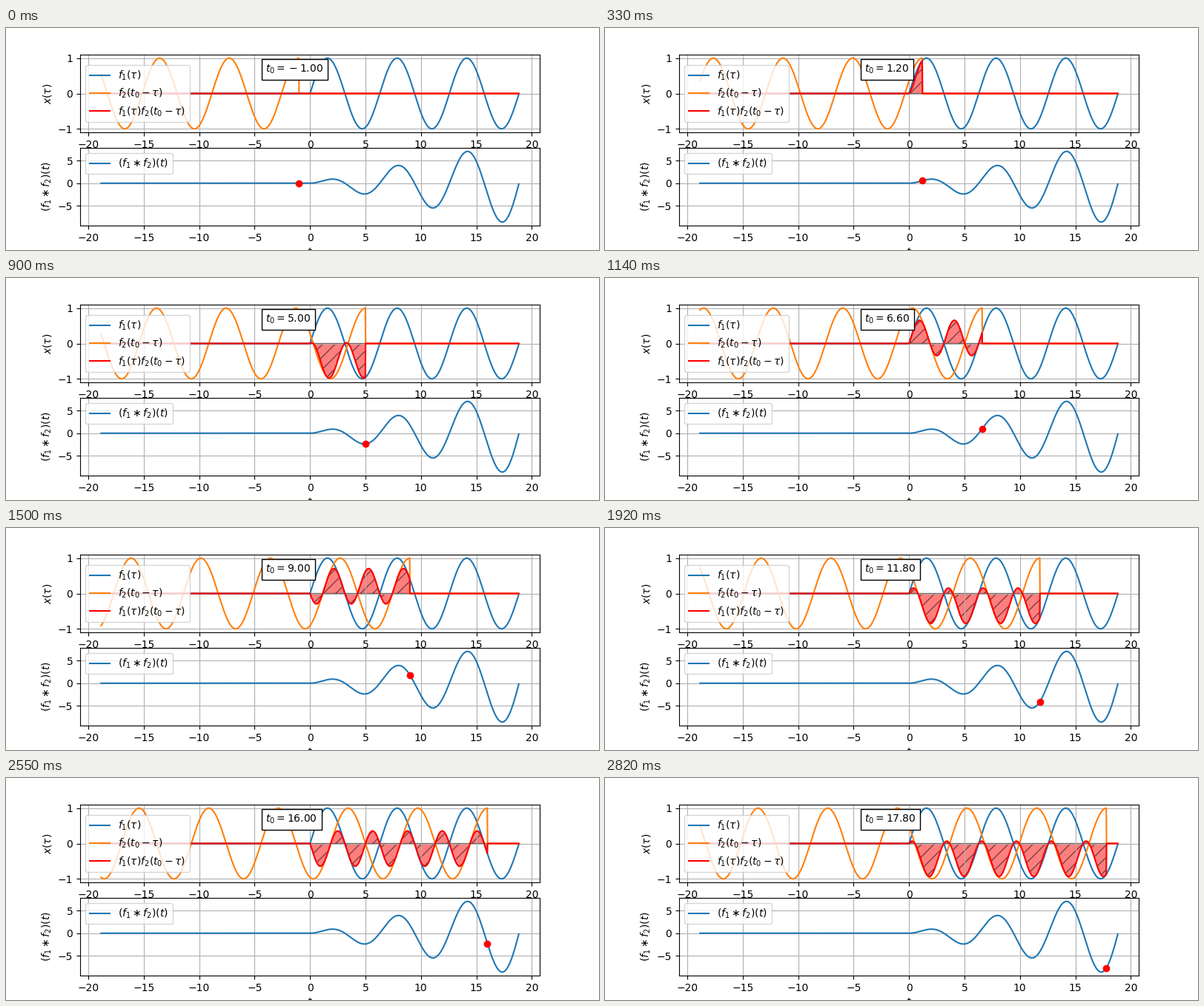
Write a matplotlib script that moves like this. It is 800 px wide and 300 px high and loops after 2850 ms.

```python
import numpy as np
import matplotlib.pyplot as plt
from matplotlib.animation import FuncAnimation

FRAMES, INTERVAL = 95, 30
T_START, T_STEP = -1.0, 0.2

tau = np.arange(-6 * np.pi, 6 * np.pi, 1 / 50)


def f1(t):
    return np.sin(t) * (t > 0)


def f2(t):
    return np.cos(t) * (t > 0)


def convolution(t):
    """Closed form of the integral of sin(u) cos(t - u) over 0..t."""
    return 0.5 * t * np.sin(t) * (t > 0)


fig, (top, bottom) = plt.subplots(2, figsize=(8, 3), dpi=100)

top.plot(tau, f1(tau), label=r'$f_1(\tau)$')
shifted, = top.plot(tau, f2(-tau), label=r'$f_2(t_0-\tau)$')
area, = top.fill(tau, 0 * tau, color='r', alpha=0.5, edgecolor='black', hatch='//')
product, = top.plot(tau, 0 * tau, 'r-', label=r'$f_1(\tau)f_2(t_0-\tau)$')
label = top.text(-4, 0.6, '', bbox=dict(fc='white'))
top.set_ylabel(r'$x(\tau)$')
top.set_ylim(-1.1, 1.1)
top.legend(loc='center left')
top.grid(True)

bottom.plot(tau, convolution(tau), label=r'$(f_1 \ast f_2)(t)$')
marker, = bottom.plot([0], [0], 'ro')
bottom.set_xlabel('$t$')
bottom.set_ylabel(r'$(f_1 \ast f_2)(t)$')
bottom.legend(loc='upper left')
bottom.grid(True)


def update(i):
    t0 = T_START + T_STEP * i
    kernel = f2(t0 - tau)
    overlap = f1(tau) * kernel
    shifted.set_ydata(kernel)
    product.set_ydata(overlap)
    area.set_xy(np.column_stack([tau, overlap]))
    label.set_text(f'$t_0={t0:.2f}$')
    marker.set_data([t0], [convolution(t0)])
    return shifted, area, product, label, marker


anim = FuncAnimation(fig, update, frames=FRAMES, interval=INTERVAL,
                     repeat=True, repeat_delay=0)
plt.show()
```
